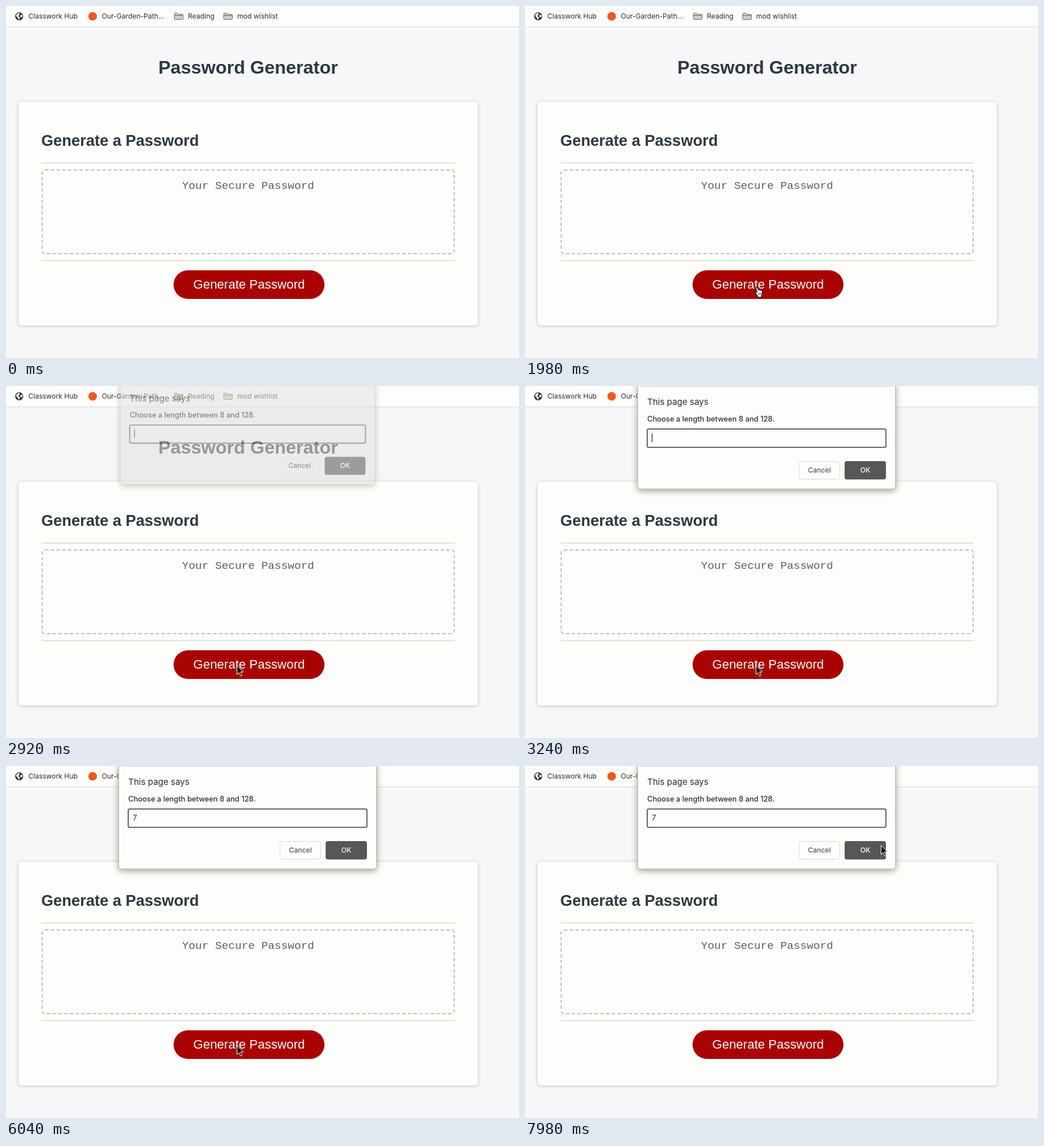
An HTML page for the animation above (8 s loop, 894 px wide and 614 px high).

```html
<!DOCTYPE html>
<html lang="en">
<head>
<meta charset="utf-8">
<title>Password Generator</title>
<style>
  html, body { margin: 0; width: 100%; height: 100%; overflow: hidden; background: #f7f7fa; }
  #stage { position: absolute; left: 0; top: 0; width: 894px; height: 614px; overflow: hidden; background: #f7f7fa; }
  #stage > * { position: absolute; box-sizing: border-box; }
  .bar { left: 0; top: 0; width: 894px; height: 37px; background: #fdfdfc; border-bottom: 1px solid #d9d9d4; }
  .card { left: 22px; top: 167px; width: 800px; height: 390px; border-radius: 5px; background: #fdfdfb;
          box-shadow: 0 1px 5px 1px rgba(150, 150, 125, .4); }
  .field { left: 62px; top: 285px; width: 720px; height: 148px; border: 2px dashed #bebecb; border-radius: 6px; }
  svg { left: 0; top: 0; }
  text { white-space: pre; }
  .ui { font-family: Inter, "Open Sans", sans-serif; font-size: 12px; fill: #2d2d2b; }
  .page { font-family: "Liberation Sans", Arial, sans-serif; fill: #2d3841; }
  .bold { font-weight: 700; }
  .mono { font: 19.2px "Liberation Mono", monospace; fill: #5f5f63; }
  .mid { text-anchor: middle; }
  .medium { font-weight: 500; }
  .panel { filter: drop-shadow(0 3px 6px rgba(120, 120, 95, .7)); }
</style>
</head>
<body>
<div id="stage">
  <div class="bar"></div>
  <div class="card"></div>
  <div class="field"></div>
  <svg width="894" height="614" viewBox="0 0 894 614">
    <defs>
      <g id="folder" stroke="#66665c" stroke-linejoin="round">
        <path d="M.5 10.5v-9q0-1 1-1h4l2 2h7q1 0 1 1v7q0 1-1 1h-13q-1 0-1-1z" fill="#d0d0c4"/>
        <path d="M.5 4.5h15" fill="none"/>
      </g>
    </defs>

    <g class="ui">
      <circle cx="23" cy="18" r="7" fill="#303330"/>
      <path d="M18 15l4-3 2 1-1 3-2 2 3 1v3l-2 2-1-3-3-3zM25 16l3-1 1 3-2 2-2-1z" fill="#fdfdfc"/>
      <text x="39" y="22">Classwork Hub</text>
      <circle cx="151" cy="18" r="7.5" fill="#ee5a24"/>
      <text x="167" y="22">Our-Garden-Path...</text>
      <use href="#folder" x="293" y="12"/>
      <text x="317" y="22">Reading</text>
      <use href="#folder" x="379" y="12"/>
      <text x="403" y="22">mod wishlist</text>
    </g>

    <g class="page">
      <text class="bold mid" x="422" y="118" font-size="32">Password Generator</text>
      <text class="bold" x="61.5" y="244" font-size="27">Generate a Password</text>
      <path d="M62 274h720M62 444h720" stroke="#dcdccb" stroke-width="1.5"/>
      <text class="mono mid" x="422" y="319">Your Secure Password</text>
      <rect x="292" y="461" width="263" height="50" rx="25" fill="#a80202"/>
      <text class="mid" x="423.5" y="493" font-size="22" style="fill:#fdfdf8">Generate Password</text>
    </g>

    <g id="dialog" class="ui">
      <rect id="panel" class="panel" x="196.5" y="-5.5" width="449" height="185" rx="5" stroke="#b9b9b0"/>
      <path d="M201 .5h440" stroke="#d4d4cd"/>
      <text x="213" y="33" style="font-size:15px">This page says</text>
      <text class="medium" x="213" y="62" style="font-size:12.8px">Choose a length between 8 and 128.</text>
      <rect x="213" y="75" width="416" height="32" rx="2.5" fill="none" stroke="#666662" stroke-width="2"/>
      <text id="digit" x="221" y="95" style="font-size:13px">7</text>
      <path id="caret" d="M0 83v15" stroke="#1c1c1a" stroke-width="1.2"/>
      <rect x="477.5" y="131.5" width="71" height="31" rx="4" fill="none" stroke="#dadacc"/>
      <text class="mid medium" x="513" y="151" style="fill:#555552">Cancel</text>
      <rect x="557" y="131" width="72" height="32" rx="4" fill="#575755"/>
      <text class="mid medium" x="593" y="151" style="fill:#fdfdf8">OK</text>
    </g>

    <g id="cursor" stroke-linejoin="round">
      <path id="arrow" d="M.5.5v15.7l3.6-3.4 2.6 6 2.6-1.1-2.6-5.8h4.9z" fill="#101010" stroke="#fdfdfb"/>
      <g id="hand" transform="translate(-2 -.5) scale(1.08)">
        <path d="M2.2 4.2q1.6-1.5 2.8.5l1.2 4 .1-1q1.6-.8 2.1.6 1.5-.8 2.1.6 1.7-.5 2 1.3v4q-.2 2-1.4 3.3v2.5h-6v-2q-2-2.2-3.5-5-1-1.8.4-2 1.2 0 2 1.3z"
              fill="#fdfdfb" stroke="#101010" stroke-width="1.1"/>
        <path d="M6.5 13v3M8.5 13v3M10.4 13v3" stroke="#101010" stroke-width=".8"/>
      </g>
    </g>
  </svg>
</div>
<script>
  const LOOP = 8000, OPEN = 2860, FOCUS = 2900, TYPED = 5430;
  const $ = id => document.getElementById(id);
  const [dialog, panel, digit, caret, cursor, arrow, hand] =
    ["dialog", "panel", "digit", "caret", "cursor", "arrow", "hand"].map($);
  const clamp = v => Math.min(1, Math.max(0, v));
  const smooth = v => v * v * (3 - 2 * v);
  const show = (el, on) => { el.style.display = on ? "" : "none"; };

  // time, x, y of the pointer tip
  const track = [
    [1000, 440, 634], [1560, 402, 487], [6150, 402, 487],
    [6750, 624, 295], [6930, 624, 295], [7400, 620, 138]
  ];

  function pointer(t) {
    let i = 0;
    while (i < track.length - 2 && t > track[i + 1][0]) i++;
    const [t0, x0, y0] = track[i], [t1, x1, y1] = track[i + 1];
    const k = smooth(clamp((t - t0) / (t1 - t0)));
    return [x0 + (x1 - x0) * k, y0 + (y1 - y0) * k];
  }

  function draw(t) {
    const away = (1 - clamp((t - OPEN) / 180)) ** 2;
    const scale = 1 - 0.028 * away, grey = 253 - 62 * away;
    show(dialog, t >= OPEN);
    dialog.setAttribute("opacity", 1 - away);
    dialog.setAttribute("transform", `translate(421 ${84 - 16 * away}) scale(${scale}) translate(-421 -84)`);
    panel.setAttribute("fill", `rgb(${grey},${grey},${grey - 1})`);
    panel.setAttribute("stroke-opacity", 1 - away);

    const typed = t >= TYPED;
    const blink = t - (typed ? TYPED : FOCUS);
    show(digit, typed);
    show(caret, t >= FOCUS && blink % 1000 < 500);
    caret.setAttribute("transform", `translate(${typed ? 228.8 : 221.5} 0)`);

    const [x, y] = pointer(t);
    const over = t < OPEN && y < 508;
    cursor.setAttribute("transform", `translate(${x} ${y})`);
    show(hand, over);
    show(arrow, !over);
  }

  function tick() {
    draw(performance.now() % LOOP);
    requestAnimationFrame(tick);
  }
  tick();
</script>
</body>
</html>
```
